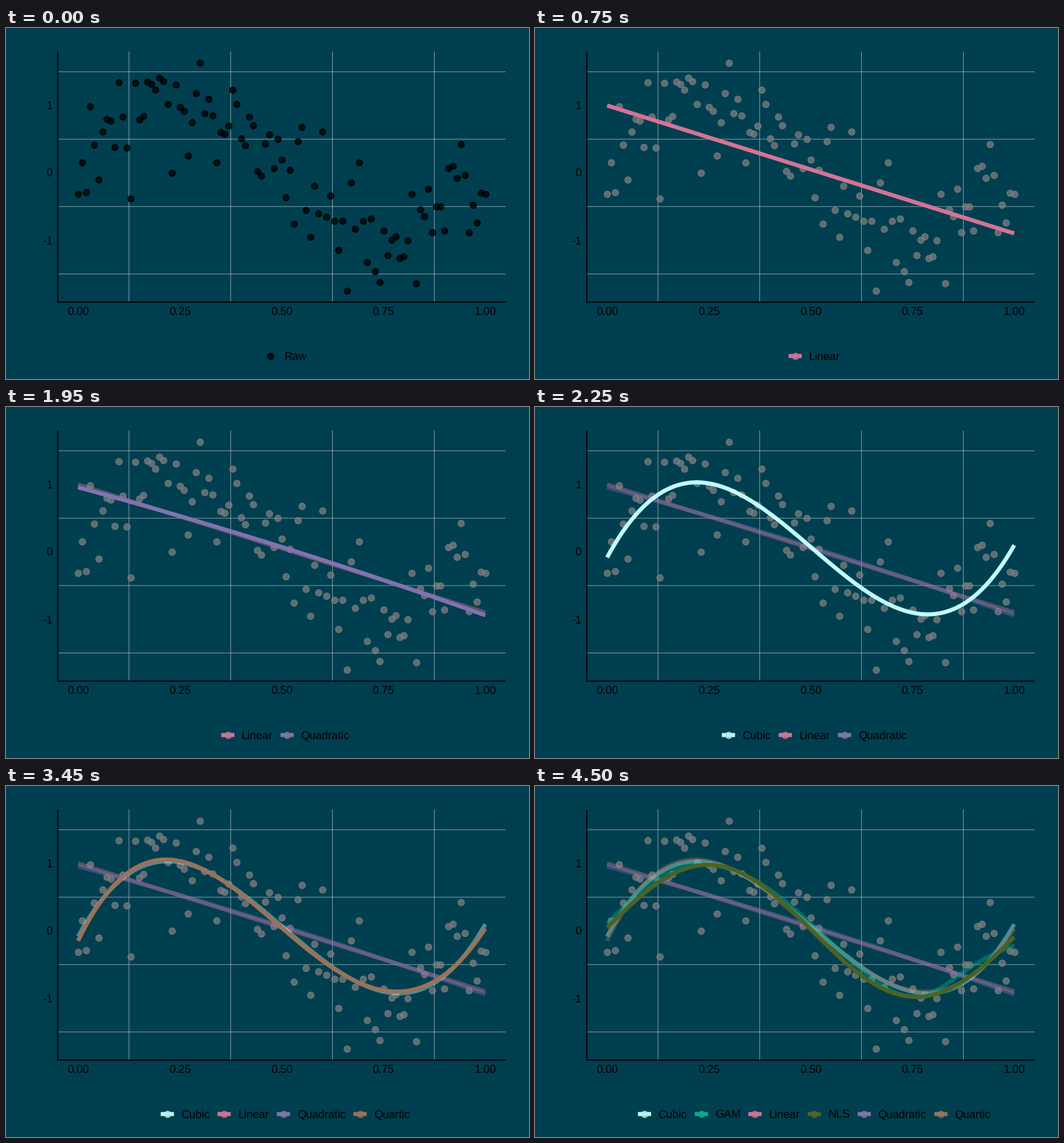
A matplotlib script for the animation above (5.25 s loop, 914 by 613 pixels).

```python
import math
import random

import numpy as np
import matplotlib.pyplot as plt
from matplotlib.animation import FuncAnimation
from matplotlib.colors import to_rgb

W, H, DPI = 914, 613, 64
PT = 72 / DPI  # points per pixel
BG, GREY = "#003f50", "#7f7f7f"
LEFT, RIGHT, TOP, BOTTOM = 90.5, 873, 41, 478.7
KEY_Y = 572.9
FADED = 0.4
STEP_MS = 750

plt.rcParams.update({"font.family": "Liberation Sans", "text.hinting": "none",
                     "path.snap": False})


def r_normals(seed, count):
    """Normal draws as R's set.seed() and rnorm() make them."""
    state = []
    for _ in range(50 + 625):
        seed = (69069 * seed + 1) % 2**32
        state.append(seed)
    rng = random.Random()
    rng.setstate((3, tuple(state[51:]) + (624,), None))

    def uniform():
        return rng.getrandbits(32) / 2**32

    def quantile(p):
        z = 0.0
        for _ in range(40):
            cdf = 0.5 * math.erfc(-z / math.sqrt(2))
            z -= (cdf - p) * math.sqrt(2 * math.pi) * math.exp(z * z / 2)
        return z

    big = 2**27
    return np.array([quantile((int(big * uniform()) + uniform()) / big)
                     for _ in range(count)])


xs = np.linspace(0, 1, 101)
ys = np.sin(2 * np.pi * xs) + 0.5 * r_normals(1, xs.size)


def poly(degree):
    return np.polyval(np.polyfit(xs, ys, degree), xs)


def gam(k=10):
    """Thin plate regression spline, smoothness chosen by GCV."""
    n = xs.size
    E = np.abs(xs[:, None] - xs) ** 3 / 12
    vals, vecs = np.linalg.eigh(E)
    keep = np.argsort(-np.abs(vals))[:k]
    U, D = vecs[:, keep], np.diag(vals[keep])
    T = np.column_stack([np.ones(n), xs])
    Z = np.linalg.svd(T.T @ U)[2][2:].T
    X = np.hstack([U @ D @ Z, T])
    S = np.zeros((k, k))
    S[:-2, :-2] = Z.T @ D @ Z

    best, fit = np.inf, None
    for lam in np.logspace(-7, 1, 161):
        hat = X @ np.linalg.solve(X.T @ X + lam * S, X.T)
        trial = hat @ ys
        score = np.sum((ys - trial) ** 2) / (n - np.trace(hat)) ** 2
        if score < best:
            best, fit = score, trial
    return fit


def nls():
    """Least-squares sine wave by Gauss-Newton."""
    amp, freq, phase = 1, 2 * np.pi, 0
    for _ in range(15):
        angle = freq * xs + phase
        s, c = np.sin(angle), np.cos(angle)
        J = np.column_stack([s, amp * xs * c, amp * c])
        step = np.linalg.lstsq(J, ys - amp * s, rcond=None)[0]
        amp, freq, phase = np.array([amp, freq, phase]) + step
    return amp * np.sin(freq * xs + phase)


MODELS = [
    ("Linear", "#d57397", poly(1)),
    ("Quadratic", "#8173ae", poly(2)),
    ("Cubic", "#bfffff", poly(3)),
    ("Quartic", "#9b725a", poly(4)),
    ("GAM", "#00b08a", gam()),
    ("NLS", "#4b6223", nls()),
]

# The panel leaves a 5 % margin around the data
Y_UNIT = (BOTTOM - TOP) / (1.1 * np.ptp(ys))
Y_ZERO = TOP + (ys.max() + 0.05 * np.ptp(ys)) * Y_UNIT


def px(x):
    return 126 + 711.5 * x


def py(y):
    return Y_ZERO - Y_UNIT * y


fig = plt.figure(figsize=(W / DPI, H / DPI), dpi=DPI, facecolor=BG)
ax = fig.add_axes([0, 0, 1, 1])
ax.set_xlim(0, W)
ax.set_ylim(H, 0)
ax.axis("off")


def line(x, y, color, width, z, **kw):
    return ax.plot(x, y, color=color, lw=width * PT, zorder=z,
                   solid_capstyle="butt", **kw)[0]


def dots(x, y, color, z):
    rgba = (*to_rgb(color), 0.75)
    return ax.scatter(x, y, s=(11.2 * PT) ** 2, facecolors=[rgba],
                      edgecolors=[rgba], linewidths=1.5 * PT, zorder=z)


def label(x, y, text, align):
    return ax.text(x, y, text, fontsize=19.5 * PT, color="black",
                   ha=align, va="baseline", zorder=9)


def draw_axes():
    for v in np.arange(0.125, 1, 0.25):
        line([px(v)] * 2, [TOP, BOTTOM], "#ebebeb", 0.6, 1)
    for v in np.arange(-1.5, 2):
        line([LEFT, RIGHT], [py(v)] * 2, "#ebebeb", 0.6, 1)
    for v in np.linspace(0, 1, 5):
        line([px(v)] * 2, [BOTTOM, BOTTOM + 3], "#333333", 1, 1, alpha=0.6)
        label(px(v), 502, f"{v:.2f}", "center")
    for v in (-1, 0, 1):
        line([LEFT - 3, LEFT], [py(v)] * 2, "#333333", 1, 1, alpha=0.6)
        label(81.5, py(v) + 7, str(v), "right")
    line([LEFT, LEFT], [TOP, BOTTOM + 1], "black", 2, 6)
    line([LEFT - 1, RIGHT], [BOTTOM, BOTTOM], "black", 2, 6)


def legend(entries, with_line=True):
    """Centred row of keys and labels."""
    texts = [label(0, 580, name, "left") for name, _ in entries]
    widths = [t.get_window_extent().width + 49.4 for t in texts]
    left = 482.3 - sum(widths) / 2
    parts = list(texts)
    for (_, color), text, width in zip(entries, texts, widths):
        key = left + 24.2
        text.set_x(key + 24)
        tint = color
        if with_line:
            parts.append(line([key - 11.5, key + 11.5], [KEY_Y] * 2, color, 7.1, 7))
            tint = 0.85 * np.array(to_rgb(color)) + 0.15 * np.array(to_rgb(GREY))
        parts.append(dots([key], [KEY_Y], tint, 8))
        left += width
    return parts


draw_axes()
raw = dots(px(xs), py(ys), "black", 2)
muted = dots(px(xs), py(ys), GREY, 2)
curves = [line(px(xs), py(y), color, 7.1, 3 + 0.1 * i)
          for i, (_, color, y) in enumerate(MODELS)]
legends = [legend([("Raw", "black")], with_line=False)]
for n in range(1, len(MODELS) + 1):
    legends.append(legend(sorted((name, color) for name, color, _ in MODELS[:n])))


def update(step):
    raw.set_visible(step == 0)
    muted.set_visible(step > 0)
    for i, curve in enumerate(curves, 1):
        curve.set_visible(i <= step)
        curve.set_alpha(1 if i == step else FADED)
    for i, parts in enumerate(legends):
        for part in parts:
            part.set_visible(i == step)
    return []


anim = FuncAnimation(fig, update, frames=len(MODELS) + 1, interval=STEP_MS,
                     repeat=True, repeat_delay=0, blit=False)
plt.show()
```
